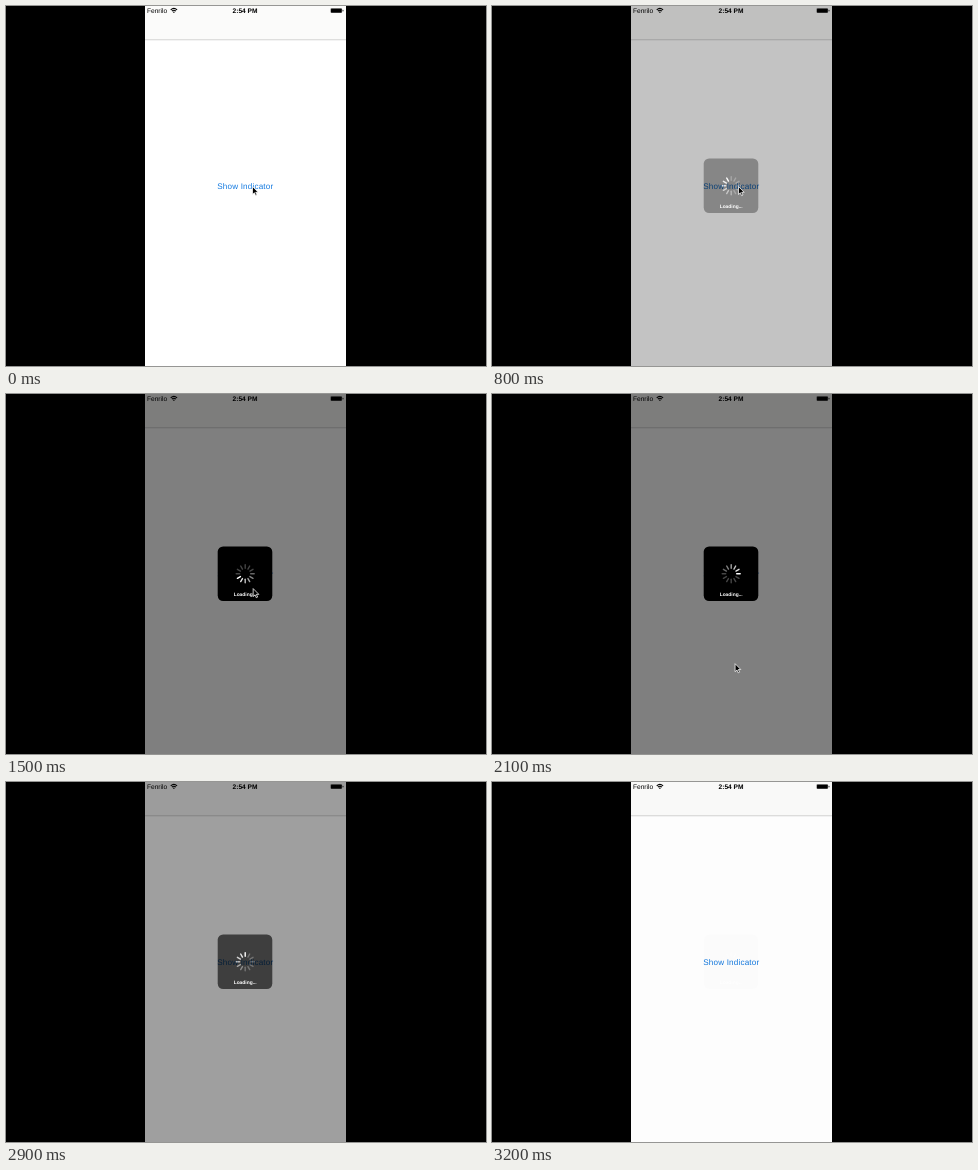
Write an HTML page that moves like this. It is 480 by 360 pixels and loops after 4300 ms.

```html
<!DOCTYPE html>
<html lang="en">
<head>
<meta charset="utf-8">
<title>Loading indicator</title>
<style>
  html, body { margin: 0; width: 100%; height: 100%; overflow: hidden; background: #000; }
  svg { display: block; width: 100vw; height: 100vh; }
  text {
    font-family: "Liberation Sans", Arial, sans-serif;
    text-rendering: geometricPrecision;
  }
  .bold { font-weight: bold; }
  .middle { text-anchor: middle; }
  .button { font-size: 8.15px; letter-spacing: .02em; fill: #147ae0; }
</style>
</head>
<body>
<svg viewBox="0 0 480 360">
  <rect width="480" height="360"/>
  <rect x="139" width="201" height="360" fill="#fff"/>
  <rect x="139" width="201" height="33.5" fill="#fbfbfa"/>
  <rect x="139" y="33.5" width="201" height=".7" fill="#c0c0c0"/>

  <g font-size="6.6">
    <text x="141" y="7">Fenrilo</text>
    <text class="bold middle" x="239" y="7">2:54 PM</text>
  </g>
  <path d="M164.7 3.9Q167.9 .9 171.1 3.9M165.9 5.2Q167.9 3.3 169.9 5.2" fill="none" stroke="#000" stroke-width="1.1"/>
  <path d="M166.8 6Q167.9 5.1 169 6L167.9 7.1Z"/>
  <rect x="324.5" y="2.3" width="11.6" height="4.6" rx=".8" fill-opacity=".55"/>
  <rect x="325" y="2.8" width="10.6" height="3.6" rx=".4"/>
  <rect x="336.6" y="3.7" width=".8" height="1.8" rx=".4"/>

  <text class="button middle" x="239.3" y="182.8">Show Indicator</text>

  <g id="overlay" opacity="0">
    <rect x="139" width="201" height="360" fill-opacity=".5"/>
    <rect x="211.7" y="152.4" width="54.6" height="54.6" rx="5.4"/>
    <g id="spinner" transform="translate(239.2 179.8)" stroke="#fff" stroke-width="1.4" stroke-linecap="round"></g>
    <text class="bold middle" x="239.2" y="202.2" font-size="4.9" fill="#fff">Loading...</text>
  </g>

  <path id="cursor" d="M0 0V8L1.9 6.3L3.1 9.1L4.5 8.5L3.2 5.8H5.7Z" stroke="#fff" stroke-width=".75"/>
</svg>
<script>
  const LOOP = 4300, STEP = 100, SPOKES = 12;
  const overlay = document.getElementById('overlay');
  const spinner = document.getElementById('spinner');
  const cursor = document.getElementById('cursor');

  // Eased progress from 0 to 1, beginning at start and lasting duration.
  function ease(t, start, duration) {
    const k = Math.min(1, Math.max(0, (t - start) / duration));
    return (1 - Math.cos(Math.PI * k)) / 2;
  }

  const spokes = Array.from({ length: SPOKES }, (_, i) => {
    const line = document.createElementNS('http://www.w3.org/2000/svg', 'line');
    line.setAttribute('y1', -5.5);
    line.setAttribute('y2', -9);
    line.setAttribute('transform', `rotate(${i * 360 / SPOKES})`);
    return spinner.appendChild(line);
  });

  function draw(now) {
    const t = Math.floor((now % LOOP) / STEP) * STEP;
    overlay.setAttribute('opacity', ease(t, 540, 540) - ease(t, 2735, 500));

    // One turn per second; the tail fades behind the leading spoke.
    const head = Math.floor(t * SPOKES / 1000) + 2;
    spokes.forEach((line, i) => {
      const age = (head - i + SPOKES) % SPOKES;
      line.setAttribute('stroke-opacity', Math.max(.27, 1 - age * .12));
    });

    // The pointer drops in a shallow arc that bulges to the right.
    const drop = ease(t, 1370, 500);
    const x = 246.5 - 3.4 * drop + 9 * drop * (1 - drop);
    const y = 180.5 + 89.2 * drop;
    cursor.setAttribute('transform', `translate(${x} ${y})`);
    cursor.setAttribute('visibility', t < 2900 ? 'visible' : 'hidden');
  }

  const start = performance.now();
  function tick() {
    draw(performance.now() - start);
    requestAnimationFrame(tick);
  }
  tick();
</script>
</body>
</html>
```
